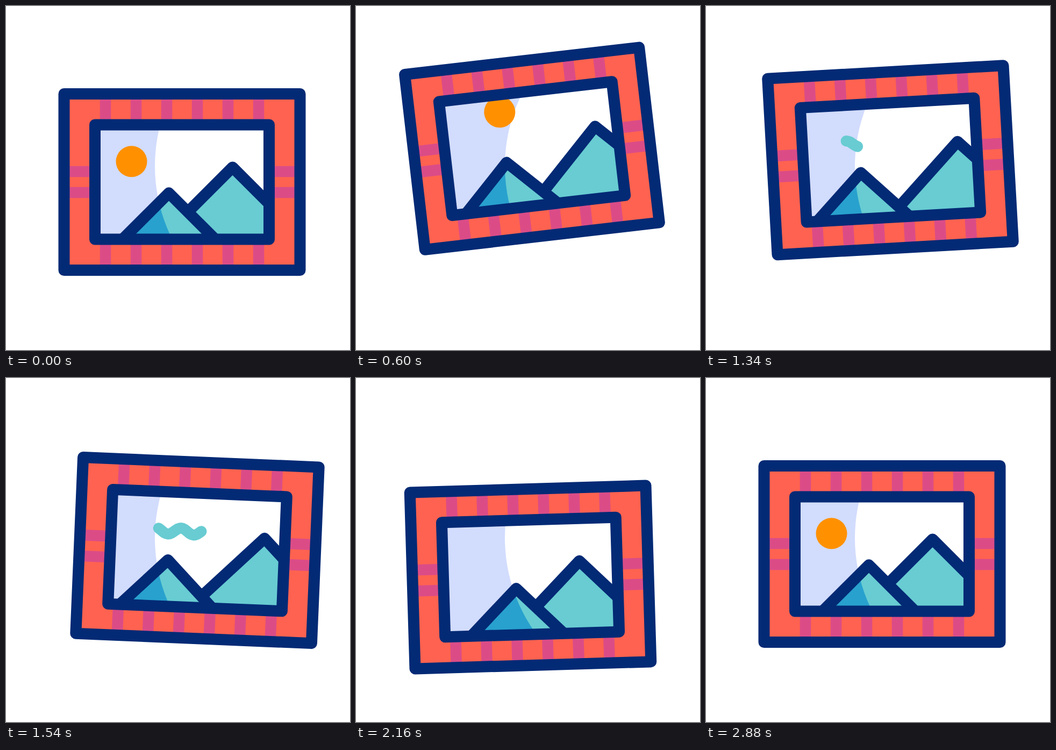
An HTML page that plays this animation: 640x640 px, repeating every 3.6 s.

```html
<!DOCTYPE html>
<html lang="en">
<head>
<meta charset="utf-8">
<title>Picture frame</title>
<style>
  html, body { margin: 0; width: 100%; height: 100%; overflow: hidden; background: #fff; }
  svg { display: block; width: 100vw; height: 100vh; }
  .line { fill: none; stroke: #032a75; stroke-width: 21; stroke-linejoin: round; stroke-linecap: round; }
  .stripe { fill: none; stroke: #db4c87; stroke-width: 20.5; }
</style>
</head>
<body>
<svg viewBox="0 0 640 640">
  <defs>
    <clipPath id="window"><rect x="-157" y="-101" width="314" height="202"/></clipPath>
    <clipPath id="slope"><path d="M-154.5 150.3L-24.5 20.3L105.5 150.3Z"/></clipPath>
  </defs>
  <g id="picture">
    <rect x="-219.5" y="-164" width="439" height="328" fill="#ff6250"/>
    <path id="stripes" class="stripe"/>
    <rect class="line" x="-219.5" y="-164" width="439" height="328"/>
    <g clip-path="url(#window)">
      <rect x="-162" y="-106" width="324" height="212" fill="#d2dcfd"/>
      <circle id="skyLight" r="302" fill="#fff"/>
      <circle id="sun" r="29" fill="#ff9100"/>
      <path id="wave" d="M-80-40c9 0 15 12 24 12s15-12 24-12s15 12 24 12s15-12 24-12" pathLength="1"
        fill="none" stroke="#68ccd2" stroke-width="20.5" stroke-linecap="round"/>
      <g id="bigHill">
        <path class="line" style="fill:#68ccd2" d="M-86 152.5L94-27.5L274 152.5"/>
      </g>
      <g id="smallHill">
        <g clip-path="url(#slope)">
          <rect x="-160" y="0" width="270" height="160" fill="#28a1ce"/>
          <circle id="hillLight" r="302" fill="#68ccd2"/>
        </g>
        <path class="line" d="M-154.5 150.3L-24.5 20.3L105.5 150.3"/>
      </g>
    </g>
    <rect class="line" x="-162" y="-106.5" width="324" height="213"/>
  </g>
</svg>
<script>
const LOOP = 3600, STEP = 20;
const LIGHT = { x: 579, y: 298 };
const $ = id => document.getElementById(id);
const set = (id, attrs) => {
  for (const name in attrs) $(id).setAttribute(name, attrs[name]);
};

// Smooth track through [time, value] keys that never overshoots a key.
function track(keys) {
  const slopes = keys.slice(1).map((k, i) => (k[1] - keys[i][1]) / (k[0] - keys[i][0]));
  const tangents = keys.map((_, i) => {
    const a = slopes[i - 1], b = slopes[i];
    return a * b > 0 ? 2 * a * b / (a + b) : 0;
  });
  return t => {
    if (t <= keys[0][0]) return keys[0][1];
    const i = keys.findIndex(k => k[0] > t) - 1;
    if (i < 0) return keys[keys.length - 1][1];
    const [t0, v0] = keys[i], [t1, v1] = keys[i + 1];
    const h = t1 - t0, u = (t - t0) / h, w = 1 - u;
    return v0 * w * w * (1 + 2 * u) + v1 * u * u * (3 - 2 * u)
      + h * u * w * (tangents[i] * w - tangents[i + 1] * u);
  };
}

const centerX = track([
  [640, 327.5], [1000, 329], [1180, 333.5], [1340, 343], [1540, 356], [1690, 361.3], [1760, 360.7],
  [1900, 352.5], [2000, 342], [2160, 324.5], [2230, 320], [2260, 320.7], [2400, 325], [2540, 327], [2700, 327.5]
]);
const centerY = track([
  [105, 327.5], [279, 316], [414, 291], [600, 265.2], [640, 264], [920, 254.5], [1000, 255], [1180, 264],
  [1340, 286.7], [1720, 351.5], [1760, 357.6], [1900, 372.5], [1990, 376.5], [2160, 370.5], [2260, 362.5],
  [2400, 345], [2540, 333], [2680, 328.5], [2800, 327.5]
]);
const tilt = track([
  [105, 0], [279, -1.2], [414, -3.85], [600, -6.6], [640, -7], [910, -7.65], [1000, -7.47], [1180, -6.95],
  [1340, -3.2], [1540, 2.4], [1720, 5.94], [1760, 6.45], [1820, 6.75], [1900, 5.9], [2000, 3.1],
  [2160, -1.7], [2240, -2.95], [2400, -2.4], [2540, -1], [2680, -0.2], [2800, 0]
]);
const bigShift = track([
  [105, 0], [279, 4], [414, 14], [600, 27.2], [1000, 31], [1260, 32.8], [1340, 32.6], [1760, 24.4],
  [2160, -2.1], [2300, -3.5], [2600, -1.8], [2880, 0]
]);
const smallShift = track([
  [105, 0], [279, -4], [414, -13.5], [600, -25.5], [1000, -29.6], [1260, -32], [1340, -31.8], [1760, -24.2],
  [2160, -2.6], [2300, -0.8], [2500, 0]
]);
const sunLeaves = track([[105, 0], [300, 8], [420, 19], [600, 42], [1000, 99], [1300, 180]]);
const sunReturns = track([[2160, -135], [2400, -85], [2600, -42], [2700, -22], [2800, -7], [2880, 0]]);
const waveEnd = track([[1220, 0], [1620, 1]]);
const waveStart = track([[1480, 0], [1880, 1]]);

function draw(t) {
  const x = centerX(t), y = centerY(t), angle = tilt(t);
  set('picture', { transform: `translate(${x} ${y}) rotate(${angle})` });

  // The light edge stays put on the stage while the picture moves.
  const a = angle * Math.PI / 180, dx = LIGHT.x - x, dy = LIGHT.y - y;
  const lx = dx * Math.cos(a) + dy * Math.sin(a);
  const ly = dy * Math.cos(a) - dx * Math.sin(a);
  const small = smallShift(t);
  set('skyLight', { cx: lx, cy: ly });
  set('hillLight', { cx: lx - small, cy: ly });
  set('smallHill', { transform: `translate(${small})` });
  set('bigHill', { transform: `translate(${bigShift(t)})` });

  const sun = t < 1700 ? sunLeaves(t) : sunReturns(t);
  set('sun', { cx: -94 + sun, cy: -38.2 - 0.86 * sun });

  const start = waveStart(t), length = waveEnd(t) - start;
  set('wave', {
    visibility: length > 0 ? 'visible' : 'hidden',
    'stroke-dasharray': `${Math.max(length, 0.001)} 9`,
    'stroke-dashoffset': -start
  });
}

const columns = Array.from({ length: 6 }, (_, i) => `M${-142.5 + 57 * i}-164v328`).join('');
set('stripes', { d: columns + 'M-219.5-19.5h439M-219.5 19.5h439' });

const begin = performance.now();
function tick() {
  const t = (performance.now() - begin) % LOOP;
  draw(Math.floor(t / STEP) * STEP);
  requestAnimationFrame(tick);
}
tick();
</script>
</body>
</html>
```
